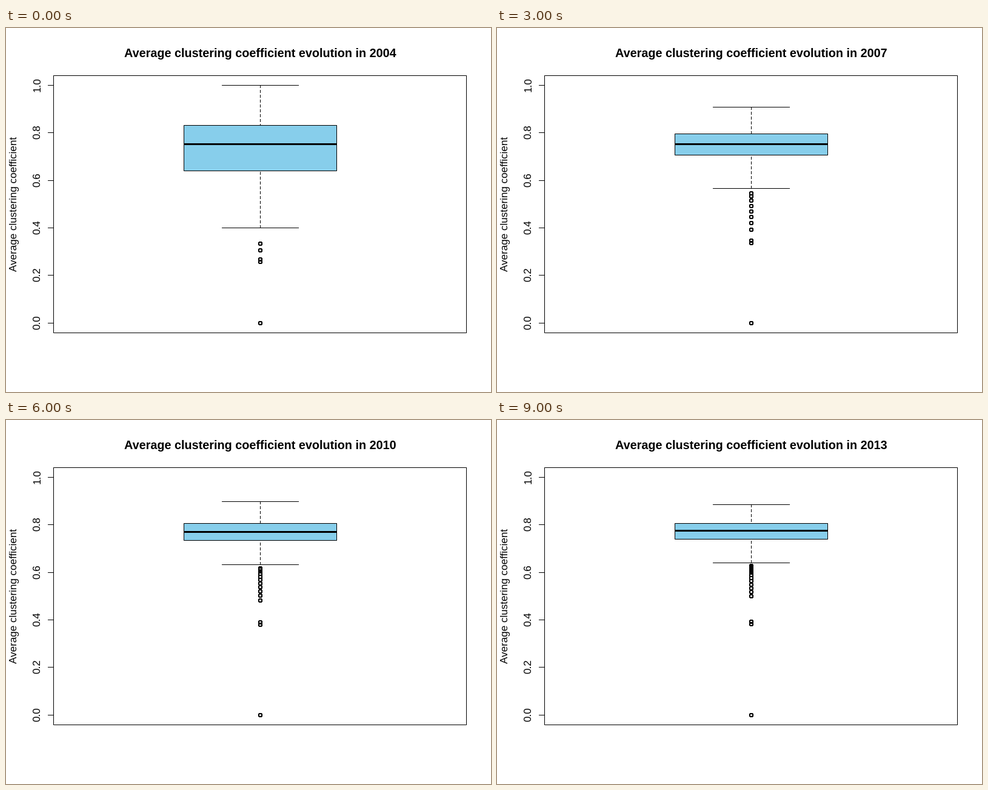
A matplotlib script that plays this animation: 800 by 600 pixels, repeating every 10000 ms.

```python
import numpy as np
import matplotlib.pyplot as plt
from matplotlib.animation import FuncAnimation
from matplotlib.patches import PathPatch, Rectangle
from matplotlib.path import Path

plt.rcParams["font.family"] = "Liberation Sans"
plt.rcParams["text.hinting"] = "native"
plt.rcParams["text.hinting_factor"] = 8

W, H, DPI = 800, 600, 100
PX = 72 / DPI
MID = 419
ZERO_ROW, ONE_ROW = 486, 94
SKY = "#87ceeb"
FIRST_YEAR, YEARS = 2004, 10

fig = plt.figure(figsize=(W / DPI, H / DPI), dpi=DPI, facecolor="white")
ax = fig.add_axes([0, 0, 1, 1])
ax.set_xlim(-0.5, W - 0.5)
ax.set_ylim(H - 0.5, -0.5)
ax.axis("off")


def settle(t, start, end, scale, power):
    """Ease from start to end, slowing down as the years pass."""
    return end + (start - end) * np.exp(-(t / scale) ** power)


def box_rows(t):
    """Pixel rows of upper whisker, box top, median, box bottom, lower whisker."""
    rows = (
        np.interp(t, (1, 2, 3, 5, 7), (94, 123, 130, 128, 139)),
        np.interp(t, (0, 1, 3, 5), (160, 166, 174, 170)),
        np.interp(t, (0, 1, 3, 5, 8), (191, 196, 190.8, 185, 181.8)),
        settle(t, 235, 195.7, 2.9, 1.4),
        settle(t, 329, 235, 2.73, 1.6),
    )
    return [round(r) for r in rows]


def outlier_rows(t):
    """A run below the whisker that gets denser, a far pair and one at zero."""
    first = settle(t, 355, 240, 2.5, 1.4)
    last = max(290, 366 - 11.5 * t)
    count = round(2 + 3.7 * t ** 0.5)
    run = first + (last - first) * np.linspace(0, 1, count) ** (1 + 0.08 * t)
    far = settle(t, 385, 336, 3, 2)
    return np.round([*run, far - 4, far, ZERO_ROW])


def line(xs=(), ys=(), width=1, **kw):
    style = dict(color="black", lw=width * PX, snap=False,
                 solid_capstyle="butt", zorder=3)
    return ax.plot(xs, ys, **{**style, **kw})[0]


def frame_rect(x0, y0, x1, y1, fill):
    return ax.add_patch(Rectangle((x0, y0), x1 - x0, y1 - y0, facecolor=fill,
                                  edgecolor="black", lw=PX, snap=False,
                                  joinstyle="miter", zorder=2))


def label(x, y, s, size, **kw):
    return ax.text(x, y, s, fontsize=size * PX, ha="center", va="baseline",
                   rotation_mode="anchor", **kw)


def circles(rows):
    return Path.make_compound_path(*[Path.circle((MID, r), 3) for r in rows])


# Static axes
frame_rect(78, 78, 759, 502, "none")
for i in range(6):
    value = i / 5
    row = int(ZERO_ROW + (ONE_ROW - ZERO_ROW) * value + 0.3)
    line((68.5, 78.5), (row, row))
    label(56, row - 1, f"{value:.1f}", 17, rotation=90)
label(18, 289.5, "Average clustering coefficient", 17, rotation=90)

# Moving parts
title = label(MID, 47, "", 19.9, weight="bold")
box = frame_rect(293, 160, 545, 235, SKY)
median = line(width=3)
caps = [line(), line()]
whiskers = [line(ls=(0, (5, 3)), dash_capstyle="butt") for _ in range(2)]
dots = ax.add_patch(PathPatch(circles([ZERO_ROW]), fill=False, lw=PX,
                              edgecolor="black", snap=False,
                              antialiased=False, zorder=4))


def update(i):
    top, upper, mid, lower, bottom = box_rows(i)
    title.set_text(f"Average clustering coefficient evolution in {FIRST_YEAR + i}")
    box.set_y(upper)
    box.set_height(lower - upper)
    median.set_data((292.5, 545.5), (mid, mid))
    for cap, row in zip(caps, (top, bottom)):
        cap.set_data((355.5, 482.5), (row, row))
    # Dashes run from the whisker ends towards the box
    whiskers[0].set_data((MID, MID), (top - 0.5, upper))
    whiskers[1].set_data((MID, MID), (bottom + 0.5, lower))
    dots.set_path(circles(outlier_rows(i)))
    return [title, box, median, *caps, *whiskers, dots]


anim = FuncAnimation(fig, update, frames=YEARS, interval=1000,
                     init_func=lambda: update(0), repeat=True, repeat_delay=0)
plt.show()
```
